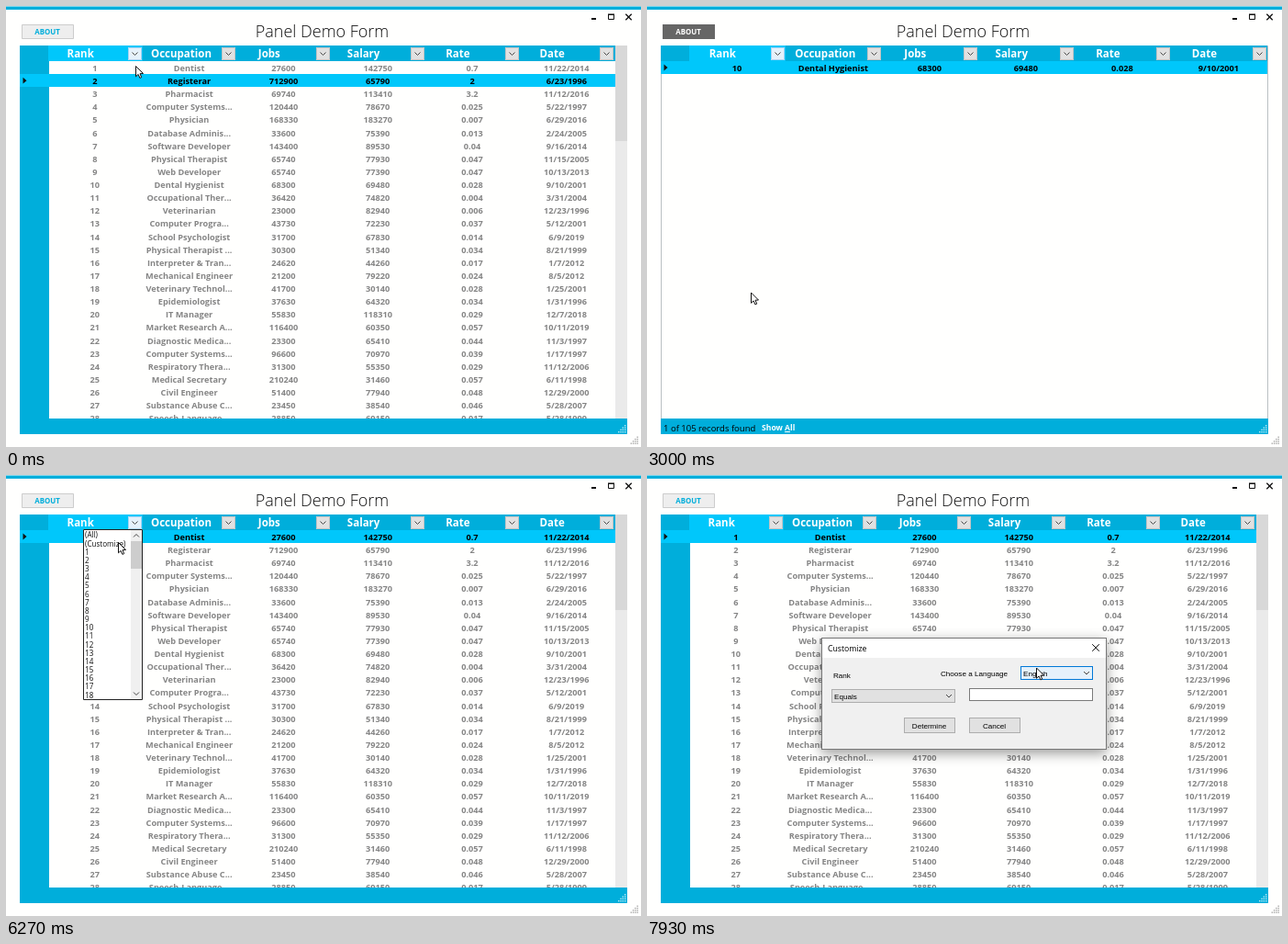
Animation, 692 px wide and 480 px high, one loop 8000 ms. Source, as an HTML page with a canvas:

```html
<!DOCTYPE html>
<html lang="en">
<head>
<meta charset="utf-8">
<title>Grid filter demo</title>
<style>
html, body { margin: 0; width: 100%; height: 100%; overflow: hidden; background: #fff; }
canvas { display: block; width: 692px; height: 480px; }
</style>
</head>
<body>
<canvas id="stage" width="692" height="480"></canvas>
<script>
const stage = document.getElementById('stage').getContext('2d');
let ctx = stage;
const LOOP = 8000;
const BLUE = '#00aedb', BRIGHT = '#00c7fb', ACCENT = '#0078d7';
const UI = '"Open Sans", "Noto Sans", sans-serif';
const FORM = '"Liberation Sans", Arial, sans-serif';
const ROW_TOP = 60, ROW_H = 14.13, GRID_LEFT = 45.8, GRID_BOTTOM = 449;

const rows = `Dentist|27600|142750|0.7|11/22/2014
Registerar|712900|65790|2|6/23/1996
Pharmacist|69740|113410|3.2|11/12/2016
Computer Systems...|120440|78670|0.025|5/22/1997
Physician|168330|183270|0.007|6/29/2016
Database Adminis...|33600|75390|0.013|2/24/2005
Software Developer|143400|89530|0.04|9/16/2014
Physical Therapist|65740|77930|0.047|11/15/2005
Web Developer|65740|77390|0.047|10/13/2013
Dental Hygienist|68300|69480|0.028|9/10/2001
Occupational Ther...|36420|74820|0.004|3/31/2004
Veterinarian|23000|82940|0.006|12/23/1996
Computer Progra...|43730|72230|0.037|5/12/2001
School Psychologist|31700|67830|0.014|6/9/2019
Physical Therapist ...|30300|51340|0.034|8/21/1999
Interpreter & Tran...|24620|44260|0.017|1/7/2012
Mechanical Engineer|21200|79220|0.024|8/5/2012
Veterinary Technol...|41700|30140|0.028|1/25/2001
Epidemiologist|37630|64320|0.034|1/31/1996
IT Manager|55830|118310|0.029|12/7/2018
Market Research A...|116400|60350|0.057|10/11/2019
Diagnostic Medica...|23300|65410|0.044|11/3/1997
Computer Systems...|96600|70970|0.039|1/17/1997
Respiratory Thera...|31300|55350|0.029|11/12/2006
Medical Secretary|210240|31460|0.057|6/11/1998
Civil Engineer|51400|77940|0.048|12/29/2000
Substance Abuse C...|23450|38540|0.046|5/28/2007
Speech-Language...|28850|69150|0.017|5/28/1999`
  .split('\n').map((line, i) => [String(i + 1), ...line.split('|')]);
const headers = ['Rank', 'Occupation', 'Jobs', 'Salary', 'Rate', 'Date'];
const listItems = ['(All)', '(Customize)', ...rows.slice(0, 18).map(r => r[0])];

// Cursor path: time, x, y
const path = [
  [30, 141.5, 65.5], [240, 141, 57.5], [1100, 141, 57.5], [1580, 111.5, 163],
  [2985, 111.5, 163], [3000, 113.5, 312], [3100, 135, 397], [3310, 135, 397],
  [3790, 140, 463], [4480, 140, 463], [4750, 138, 75], [5000, 138, 75],
  [5200, 138.5, 53.5], [6000, 138.5, 53.5], [6270, 122.5, 73.5], [7000, 122.5, 73.5],
  [7340, 352, 221], [7580, 352, 221], [7930, 424.5, 210]
];

const clamp = v => Math.max(0, Math.min(1, v));
const within = (t, a, b) => t >= a && t < b;

function cursorAt(t) {
  const n = path.findIndex(k => k[0] > t);
  if (n === 0) return path[0].slice(1);
  if (n < 0) return path[path.length - 1].slice(1);
  const [a, b] = [path[n - 1], path[n]];
  const u = (t - a[0]) / (b[0] - a[0]), e = u * u * (3 - 2 * u);
  return [a[1] + (b[1] - a[1]) * e, a[2] + (b[2] - a[2]) * e];
}

function rect(x, y, w, h, fill, border) {
  ctx.fillStyle = fill;
  ctx.fillRect(x, y, w, h);
  if (!border) return;
  ctx.strokeStyle = border;
  ctx.lineWidth = 1;
  ctx.strokeRect(x + .5, y + .5, w - 1, h - 1);
}

// y is the middle of the capitals
function text(str, x, y, size, color, { weight = 400, align = 'left', family = UI } = {}) {
  ctx.font = `${weight} ${size}px ${family}`;
  ctx.textAlign = align;
  ctx.fillStyle = color;
  ctx.fillText(str, x, y + size * .357);
}

function line(points, color, width = 1) {
  ctx.beginPath();
  points.forEach(([x, y]) => ctx.lineTo(x, y));
  ctx.strokeStyle = color;
  ctx.lineWidth = width;
  ctx.stroke();
}

function shape(x, y, points, fill, border) {
  ctx.beginPath();
  points.forEach(([dx, dy]) => ctx.lineTo(x + dx, y + dy));
  ctx.closePath();
  ctx.fillStyle = fill;
  ctx.fill();
  if (!border) return;
  ctx.lineJoin = 'round';
  ctx.strokeStyle = border;
  ctx.lineWidth = 1;
  ctx.stroke();
}

const chevron = (x, y, dir = 1) =>
  line([[x - 3, y - 1.5 * dir], [x, y + 1.5 * dir], [x + 3, y - 1.5 * dir]], '#444');

function cross(x, y, r, width) {
  line([[x - r, y - r], [x + r, y + r]], '#111', width);
  line([[x - r, y + r], [x + r, y - r]], '#111', width);
}

function grip(x, y, color) {
  for (let i = 0; i < 4; i++)
    for (let j = 0; j <= i; j++) rect(x - 2.3 * j, y - 2.3 * (3 - i), 1.3, 1.3, color);
}

function drawWindow(aboutDark) {
  rect(0, 0, 692, 480, '#fffffe');
  rect(0, .5, 692, 3.5, BLUE);
  text('Panel Demo Form', 344.5, 27.5, 18, '#111', { weight: 300, align: 'center' });
  rect(17, 20, 57, 16, aboutDark ? '#666' : '#eee', aboutDark ? '#666' : '#ccc');
  text('ABOUT', 45, 28.3, 7.9, aboutDark ? '#fff' : BLUE, { weight: 700, align: 'center' });
  rect(638, 13, 5, 2, '#111');
  rect(656, 9, 7, 6, '#fffffe', '#111');
  rect(656, 8.5, 7, 1.5, '#111');
  cross(678.5, 12, 3.2, 1.3);
  grip(687.5, 475.5, '#999');
}

function drawHeader(step, right, hotButton) {
  rect(15, 43, right - 15, ROW_TOP - 43, BLUE);
  rect(46, 43, step, ROW_TOP - 43, BRIGHT);
  headers.forEach((name, i) => {
    const end = GRID_LEFT + step * (i + 1);
    const mid = end - step / 2 - (i === 1 ? 9 : 16);
    text(name, mid, 52.3, 11.5, '#fff', { weight: 700, align: 'center' });
    const x = Math.round(end) - 16;
    const hot = i === 0 && hotButton;
    rect(x, 45, 15, 14, hot ? '#e5f1fb' : '#e1e1e1', hot ? '#a9d3f3' : '#c4c4c4');
    chevron(x + 7.5, 52);
  });
}

function drawRow(row, i, step, right, selected) {
  const y = ROW_TOP + ROW_H * i;
  if (selected) {
    rect(15, Math.round(y), right - 15, 14, BRIGHT);
    shape(18.5, y + 7, [[0, -3.4], [4, 0], [0, 3.4]], '#111');
  }
  row.forEach((cell, c) => text(cell, GRID_LEFT - .4 + step * (c + .5), y + 7.6, 9.2,
    selected ? '#000' : '#858585', { weight: 700, align: 'center' }));
}

function drawGrid(filtered, selected, hotButton) {
  const step = filtered ? 105 : 102.8, right = filtered ? 676 : 664;
  line([[15.5, 450], [15.5, 43.5], [676.5, 43.5], [676.5, 450]], 'rgba(140,150,155,.6)');
  ctx.save();
  ctx.beginPath();
  ctx.rect(15, 43, 662, GRID_BOTTOM - 43);
  ctx.clip();
  if (!filtered) rect(15, 43, 32, 407, BLUE);
  drawHeader(step, right, hotButton);
  const shown = filtered ? [rows[9]] : rows;
  shown.forEach((row, i) => drawRow(row, i, step, right, i === selected));
  if (!filtered) {
    rect(664, 43, 13, 407, '#eaeaea');
    rect(664, 43, 13, 104, '#d8d8d8');
  }
  ctx.restore();
  rect(15, GRID_BOTTOM, 662, 466 - GRID_BOTTOM, BLUE);
  grip(674, 463, '#d5f3fb');
}

function drawStatus(hovered, pressed) {
  const color = pressed ? '#f00' : '#fff';
  text('1 of 105 records found', 18, 459.3, 9.5, '#000');
  text('Show All', 125, 459, 8.6, color, { weight: 700 });
  if (hovered) rect(125, 463, 36, 1, color);
  else rect(150, 463, 6, 1, color);
}

function drawList(active) {
  rect(84, 59, 65, 186, '#fff', '#222');
  listItems.forEach((item, i) => {
    const y = 65.4 + 9.16 * i;
    if (i === active) rect(85, y - 4.4, 51, 9.2, ACCENT);
    text(item, 86, y + .2, 8.1, i === active ? '#fff' : '#111');
  });
  rect(136, 60, 12, 184, '#f0f0f0');
  rect(136, 72, 12, 30, '#cdcdcd');
  chevron(142, 66, -1);
  chevron(142, 238);
}

function formText(label, x, y, align = 'left') {
  text(label, x, y, 8.1, '#000', { family: FORM, align });
}

function combo(label, x, y, w, hot) {
  rect(x, y, w, 15, hot ? '#e5f1fb' : '#e1e1e1', hot ? ACCENT : '#adadad');
  formText(label, x + 3, y + 7.8);
  chevron(x + w - 7, y + 7.5);
}

function button(label, x) {
  rect(x, 264, 56, 17, '#e1e1e1', '#adadad');
  formText(label, x + 27.5, 272.8, 'center');
}

function dialogBody(hotCombo) {
  rect(190, 177, 311, 122, '#f0f0f0', '#777');
  rect(191, 178, 309, 21, '#fff');
  text('Customize', 197, 188.5, 8.7, '#000');
  cross(489, 188, 3.8, 1);
  formText('Rank', 203, 218.5);
  formText('Choose a Language', 320, 216.3);
  combo('English', 407, 208, 79, hotCombo);
  combo('Equals', 201, 233, 135, false);
  rect(351, 232, 135, 14, '#fff', '#7a7a7a');
  button('Determine', 280);
  button('Cancel', 351);
}

// The dialog is composed apart so that it fades as one layer
const layer = document.createElement('canvas');
layer.width = 692;
layer.height = 480;
const layerCtx = layer.getContext('2d');

function drawDialog(t, hotCombo) {
  ctx = layerCtx;
  ctx.clearRect(0, 0, 692, 480);
  dialogBody(hotCombo);
  ctx = stage;
  const ease = 1 - (1 - clamp((t - 6910) / 200)) ** 3;
  const scale = .95 + .05 * ease;
  ctx.save();
  ctx.globalAlpha = ease;
  ctx.translate(345.5, 238);
  ctx.scale(scale, scale);
  ctx.translate(-345.5, -238);
  ctx.shadowColor = 'rgba(0,0,0,.4)';
  ctx.shadowBlur = 14;
  ctx.shadowOffsetY = 4;
  ctx.drawImage(layer, 0, 0);
  ctx.restore();
}

const arrow = [[0, 0], [0, 11.3], [2.6, 8.9], [4.4, 12.9], [6.2, 12.1], [4.5, 8.2], [8, 8]];
const hand = [[-1, 0], [1, 0], [1.4, 4.4], [4, 4.6], [6.5, 5.4], [8, 6.6], [8, 10],
  [6.5, 13.5], [0, 13.5], [-3.6, 8.6], [-3.3, 7.2], [-1, 8.5]];

function render(t) {
  const filtered = within(t, 2060, 4480);
  const [x, y] = cursorAt(t);
  const overLink = filtered && y > 454;
  const hotButton = t < 4480 || within(t, 5580, 6890);
  drawWindow(within(t, 2060, 5580));
  drawGrid(filtered, t >= 2060 ? 0 : 1, hotButton);
  if (filtered) drawStatus(overLink, t >= 4100);
  if (within(t, 650, 2060)) drawList(t >= 1930 ? 11 : -1);
  if (within(t, 5600, 6890)) drawList(t >= 6650 ? 1 : -1);
  if (t > 6910) drawDialog(t, x >= 407 && y >= 208 && y < 223);
  shape(x, y, overLink ? hand : arrow, '#fff', '#111');
}

function frame() {
  render(performance.now() % LOOP);
  requestAnimationFrame(frame);
}
frame();
</script>
</body>
</html>
```
